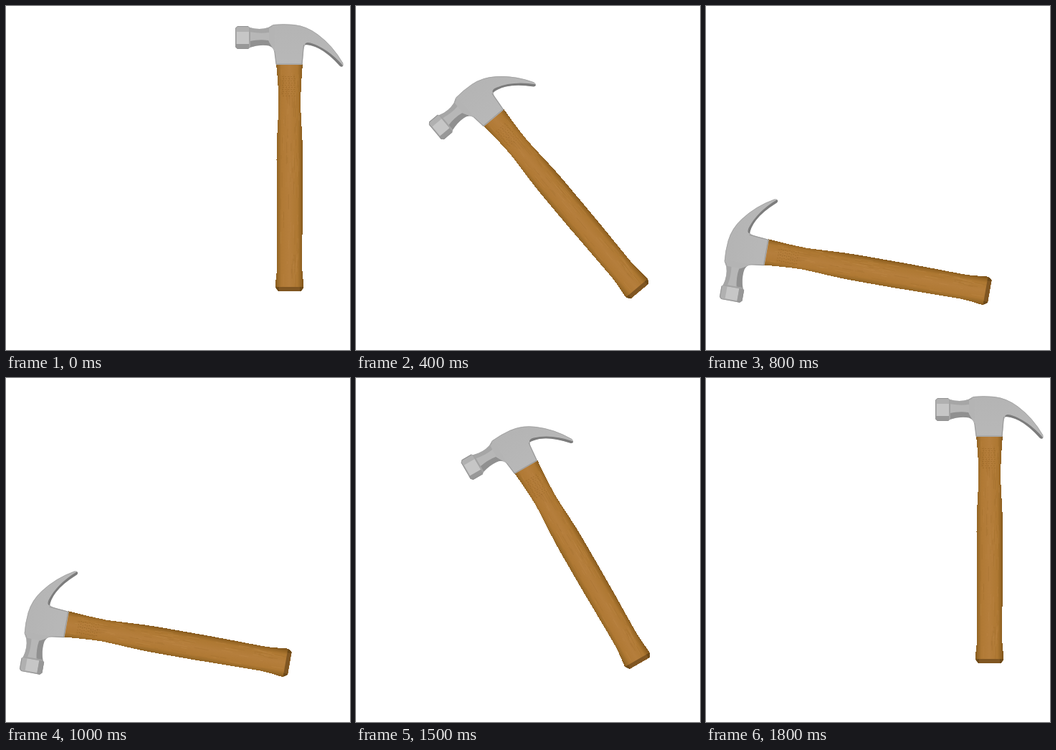
These frames come from a looping animation (480 by 480 pixels, 1.9 s). An HTML page:

```html
<!DOCTYPE html>
<html>
<head>
<meta charset="utf-8">
<style>
  html, body { margin: 0; width: 100%; height: 100%; overflow: hidden; background: #fff; }
  svg { display: block; width: 100vw; height: 100vh; }
</style>
</head>
<body>
<svg viewBox="0 0 480 480">
  <defs>
    <linearGradient id="wood">
      <stop offset="0" stop-color="#86591c"/>
      <stop offset=".1" stop-color="#996a28"/>
      <stop offset=".22" stop-color="#b07934"/>
      <stop offset=".5" stop-color="#b57e3c"/>
      <stop offset=".78" stop-color="#ae7832"/>
      <stop offset=".9" stop-color="#956524"/>
      <stop offset="1" stop-color="#7b5119"/>
    </linearGradient>
    <linearGradient id="steel" x2="0" y2="1">
      <stop offset="0" stop-color="#b4b4b4"/>
      <stop offset="1" stop-color="#b8b8b8"/>
    </linearGradient>
    <clipPath id="grip">
      <path id="handle" d="M377 81H414C412.500 100 411.500 114 411 135C411.500 160 414 180 414 210V265C414 300 413 345 413 360C413.500 375 415 383 415.500 391L414.500 394L411.500 398H380L377 394L375.500 391C376 383 378 375 378.500 360C378.500 345 378 300 377.500 265V215C377.500 180 380 160 380.500 135C380 114 379 100 377 81Z"/>
    </clipPath>
  </defs>
  <g id="hammer">
    <use href="#handle" fill="url(#wood)" shape-rendering="crispEdges"/>
    <g clip-path="url(#grip)">
      <g id="grain" fill="none" stroke-width=".8"></g>
      <path d="M375 392H416V399H375Z" fill="#805622"/>
      <path d="M375 392H381V399H375ZM410 392H416V399H410Z" fill="#6d4917"/>
    </g>

    <path d="M366 31L373 26Q387 24.500 402 26Q420 28 435 39.500Q456 55 470.500 80Q472 85 467 84.500Q455 71 444 63.500Q431 55 419 54Q415 55 415 65L413.500 82H377L375 65Q374 56 367 55Z" fill="url(#steel)"/>
    <path d="M373 26.500Q387 25 402 26.500Q420 28.500 435 40Q456 55.500 470 80" fill="none" stroke="#a3a3a3" stroke-width=".8"/>
    <path d="M417 54Q418 49.500 425 51.500Q449 59 470 83Q470 86 466 84Q450 66 436 59Q426 54 417 54Z" fill="#7c7c7c"/>
    <path d="M415.500 54Q414.500 64 413 81H377L375 65Q374 56 367 55" fill="none" stroke="#9c9c9c" stroke-width="1.200"/>

    <path d="M340 30Q354 34 366 30L373 26V57L367 55Q354 53 340 58Z" fill="#b7b7b7"/>
    <path d="M340 30Q354 34 366 30L373 26L367 37Q354 39 340 36Z" fill="#a6a6a6"/>
    <path d="M340 49Q354 46 366 48L375 63Q371 55 363 55Q352 54 340 58Z" fill="#909090"/>
    <path d="M367 31V50L375 64V27Z" fill="#b4b4b4"/>

    <path d="M320 31L323 28H338L341 31V57L338 60H323L320 57Z" fill="#b0b0b0"/>
    <path d="M322 36H339V53H322Z" fill="#c6c6c6"/>
    <path d="M320 53H341V57L338 60H323L320 57Z" fill="#989898"/>
    <path d="M339 29L341 31V57L339 59Z" fill="#a3a3a3"/>
    <path d="M320.500 31V57L323 59.500H338M320.500 31L323 28.500H338" fill="none" stroke="#939393"/>
  </g>
</svg>
<script>
  const STEP_MS = 100, STEPS = 19, PEAK = 9, DEGREES = 10;
  const hammer = document.getElementById('hammer');
  const grain = document.getElementById('grain');

  // Short wood fibres, scattered along the handle.
  let seed = 7;
  const random = () => (seed = seed * 16807 % 2147483647) / 2147483647;
  let fibres = '';
  for (let i = 0; i < 110; i++) {
    const x = 382 + random() * 27, y = 88 + random() * 295;
    const color = random() < .5 ? '#9e6c2e' : '#c08c4c';
    fibres += `<path d="M${x} ${y}v${4 + random() * 18}" stroke="${color}" opacity=".4"/>`;
  }
  // Dotted texture below the head.
  for (let y = 98; y < 128; y += 3)
    for (let x = 386 + y % 2; x < 406; x += 4)
      fibres += `<path d="M${x} ${y}v1" stroke="#855719" opacity=".7"/>`;
  grain.innerHTML = fibres;

  function draw(now) {
    const step = Math.floor(now / STEP_MS) % STEPS;
    const angle = DEGREES * (PEAK - Math.abs(step - PEAK));
    hammer.setAttribute('transform', `rotate(${-angle} 396 398)`);
    requestAnimationFrame(draw);
  }
  draw(performance.now());
</script>
</body>
</html>
```
